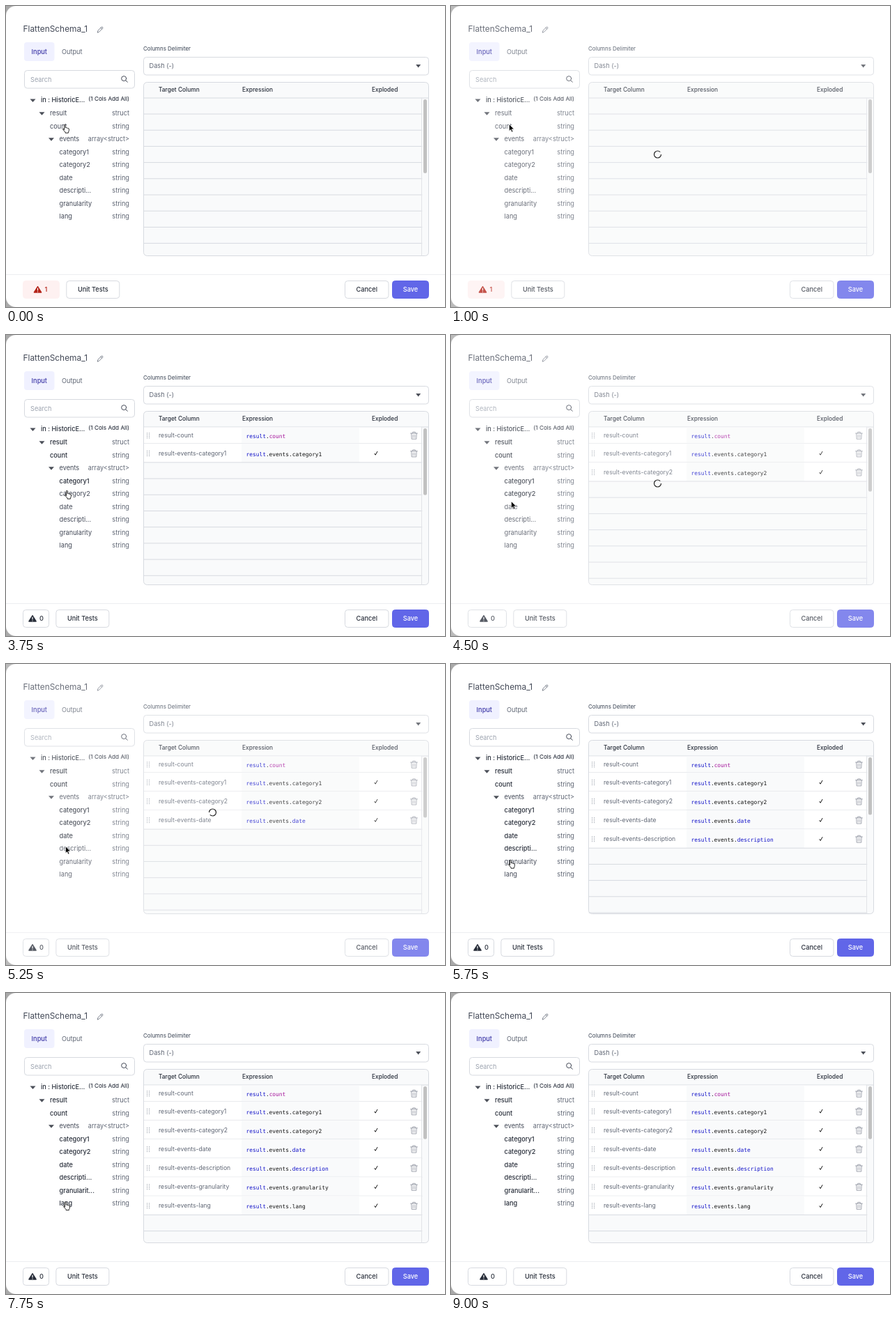
Animation, 630 px wide and 432 px high, one loop 9330 ms. Source, as an HTML page:

```html
<!DOCTYPE html>
<html lang="en">
<head>
<meta charset="utf-8">
<title>Flatten schema dialog</title>
<style>
  html, body { margin: 0; width: 100%; height: 100%; overflow: hidden; background: #fff; }
  svg { display: block; width: 630px; height: 432px; font: 9.2px Inter, sans-serif; }
  .code { font: 7.87px "DejaVu Sans Mono", monospace; white-space: pre; }
  .medium { font-weight: 500; }
  .loading { opacity: .78; filter: blur(.5px); }
</style>
</head>
<body>
<svg id="stage" viewBox="0 0 630 432"></svg>
<script>
const LOOP = 9330, STEP = 125;
const INK = '#272d39', TEXT = '#434957', MUTED = '#5f6674', BORDER = '#d7dae0', PALE = '#f9fafb';
const BLUE = '#1010c8', PURPLE = '#a5149b';

// Each field: name, colour in the expression, and its loading start, insertion and end.
const fields = [
  { name: 'count', color: PURPLE, start: 1000, added: 1250, end: 1375 },
  { name: 'category1', color: '#111', start: 3125, added: 3375, end: 3625 },
  { name: 'category2', color: '#111', start: 4000, added: 4250, end: 4625 },
  { name: 'date', color: BLUE, start: 4750, added: 5000, end: 5125 },
  { name: 'description', color: BLUE, start: 5250, added: 5500, end: 5625 },
  { name: 'granularity', color: '#111', start: 6500, added: 6750, end: 7000 },
  { name: 'lang', color: '#111', start: 7250, added: 7500, end: 7625 }
];

// Cursor stops: time, x, y.
const cursorStops = [
  [0, 83.5, 170], [2000, 83.5, 170], [2750, 86.5, 205], [3250, 86.5, 205], [3625, 86.5, 223],
  [4125, 86.5, 223], [4500, 86.5, 239], [4875, 86.5, 239], [5125, 85.5, 262],
  [5375, 85.5, 262], [5625, 84.5, 281], [6625, 84.5, 281], [7000, 84.5, 299.5], [LOOP, 84.5, 299.5]
];
const CURSOR_GONE = 8500;

const rect = (x, y, w, h, fill, stroke = 'none', r = 0) =>
  `<rect x="${x}" y="${y}" width="${w}" height="${h}" rx="${r}" fill="${fill}" stroke="${stroke}"/>`;
const text = (x, y, label, fill = TEXT, attrs = '') =>
  `<text x="${x}" y="${y}" fill="${fill}" ${attrs}>${label}</text>`;
const path = (d, fill, stroke = 'none', width = 1, move = [0, 0]) =>
  `<path d="${d}" fill="${fill}" stroke="${stroke}" stroke-width="${width}" stroke-linejoin="round" stroke-linecap="round" transform="translate(${move})"/>`;
const line = (x1, x2, y, color = BORDER) => path(`M${x1} ${y}H${x2}`, 'none', color);
const caret = (x, y, w = 8) => path(`M${-w / 2} -2h${w}l${-w / 2} 4.4z`, '#4b4f58', 'none', 1, [x, y]);
const size = px => `font-size="${px}"`;
const MEDIUM = 'class="medium"', CENTER = 'text-anchor="middle"', RIGHT = 'text-anchor="end"';

function header() {
  return text(24.5, 37.3, 'FlattenSchema_1', TEXT, size(11.9)) +
    path('M-3.7 3.8l.7-2.6L2-3.6q.8-.7 1.6 0t0 1.6L-1.2 3zM1-2.7L2.8-1', 'none', MUTED, .8, [135, 34]) +
    rect(26, 52, 43.5, 27, '#f0f1ff', 'none', 4) +
    text(47.8, 69, 'Input', '#3f3aa8', `${MEDIUM} ${CENTER}`) +
    text(80, 69, 'Output', MUTED) +
    text(197, 63.5, 'Columns Delimiter', '#374151', size(7.9)) +
    rect(197.5, 73.5, 409, 25.5, '#fff', BORDER, 4) +
    text(205.5, 89.4, 'Dash (-)', MUTED) + caret(591.7, 86, 7) +
    rect(26.5, 92.5, 158, 25.5, '#fff', BORDER, 4) +
    text(35, 108.5, 'Search', '#9ca3af') +
    path('M3.2-.9a3.5 3.5 0 1 1-7 0a3.5 3.5 0 1 1 7 0M2.3 1.7L4.8 4.3', 'none', TEXT, 1, [169.5, 105]);
}

function tree(count) {
  const rowText = (row, x, label, type, used) => {
    const y = 157 + 18.5 * row;
    return text(x, y, label, used ? INK : TEXT, used ? MEDIUM : '') + text(177, y, type, MUTED, RIGHT);
  };
  const label = (name, used) =>
    name === 'description' ? 'descripti...' : name === 'granularity' && used ? 'granularit...' : name;
  return caret(38.5, 135.5) + caret(51.5, 154.3) + caret(65, 191.3) +
    text(50, 138.2, 'in : HistoricE...', INK, MEDIUM) +
    text(177, 136.3, '(1 Cols Add All)', '#111827', `${RIGHT} ${size(8.2)}`) +
    rowText(0, 63, 'result', 'struct', count > 0) +
    rowText(2, 76.5, 'events', 'array&lt;struct&gt;', false) +
    fields.map(({ name }, i) =>
      rowText(i ? i + 2 : 1, i ? 76.5 : 63, label(name, i < count), 'string', i < count)).join('');
}

function tableRow({ name, color }, i) {
  const top = i ? 128.7 + 27.1 * i : 132.5, height = i ? 27.1 : 23.3;
  const mid = i ? top + 14.1 : 144.3;
  const span = (label, fill) => `<tspan fill="${fill}">${label}</tspan>`;
  let dots = '';
  for (let k = 0; k < 8; k++)
    dots += rect(202 + (k % 2) * 3, mid - 4 + (k >> 1) * 2.3, 1.1, 1.1, '#9ca2ac');
  const middle = i ? span('.events.', '#111') : span('.', '#111');
  return rect(198, top, 399, height, '#fff') + rect(338, top, 169, height, PALE) + dots +
    text(219, mid + 3, (i ? 'result-events-' : 'result-') + name, MUTED, size(8.65)) +
    `<text class="code" x="344.5" y="${mid + 3.9}">${span('result', BLUE)}${middle}${span(name, color)}</text>` +
    (i ? path('M-2 .4L-.8 2.3L1.9-2.6', 'none', '#111', 1, [531, mid]) : '') +
    path('M-4.8-3.2H4.8M-1.8-3.2V-5H1.8V-3.2M-3.8-3.2L-3.3 5H3.3L3.8-3.2M-1.3-1V3M1.3-1V3', 'none', '#8b909c', .8, [585.5, mid]) +
    line(198, 597, top + height);
}

function table(count) {
  const bottom = count ? 155.8 + 27.1 * (count - 1) : 131.8;
  const thumb = 50600 / (count ? 473 + 28 * count : 477);
  let lines = '';
  for (let y = bottom + 23.2; y < 358; y += 23.2) lines += line(198, 597, y);
  return rect(197.5, 109.5, 409, 249, PALE, BORDER, 5) +
    text(219, 123.4, 'Target Column', INK, `${MEDIUM} ${size(8.4)}`) +
    text(339, 123.4, 'Expression', INK, `${MEDIUM} ${size(8.4)}`) +
    text(525, 123.4, 'Exploded', INK, `${MEDIUM} ${size(8.4)}`) +
    line(198, 606, 132) + lines + fields.slice(0, count).map(tableRow).join('') +
    path('M596.5 132V358', 'none', '#e2e4e8') +
    rect(599, 134, 5, thumb, '#c1c1c1', 'none', 2.5);
}

function footer(t, warned) {
  const last = fields.filter(f => f.end <= t).pop();
  const settle = last ? Math.min(1, (t - last.end) / 250) : 1;
  const width = warned ? 53 : 35.5 + 20.5 * settle ** 3;
  const icon = 19 + width / 2, testsX = 24 + width + 9.3;
  const tint = warned ? '#b42318' : INK;
  const box = (x, w, fill, stroke) => rect(x + .5, 394.5, w - 1, 25, fill, stroke, 4);
  const button = (x, w, label, fill = '#fff', stroke = BORDER, color = INK) =>
    box(x, w, fill, stroke) + text(x + w / 2, 410.3, label, color, `${MEDIUM} ${CENTER}`);
  return line(0, 630, 385.5, '#eceef1') +
    (warned ? box(24, width, '#fef1f1', '#fef1f1') : box(24, width, '#fff', BORDER)) +
    path('M0-4.2L5 4H-5z', tint, tint, 1.6, [icon, 407]) +
    path('M0-2V1M0 3.1V3.2', 'none', '#fff', 1.2, [icon, 407]) +
    text(icon + 10, 410.3, warned ? 1 : 0, tint, MEDIUM) +
    button(testsX, 77, 'Unit Tests') + button(486, 63.5, 'Cancel') +
    button(554, 53, 'Save', '#6166e8', '#6166e8', '#fff');
}

function cursor(t, loading) {
  if (t >= CURSOR_GONE) return '';
  const next = cursorStops.findIndex(stop => stop[0] > t);
  const a = cursorStops[next - 1], b = cursorStops[next];
  const p = (t - a[0]) / (b[0] - a[0]), ease = p * p * (3 - 2 * p);
  const x = a[1] + (b[1] - a[1]) * ease, y = a[2] + (b[2] - a[2]) * ease;
  const arrow = loading || (t > 2000 && t < 3000);
  return arrow
    ? path('M0 0V9.4L2.2 7.4L3.8 11L5.4 10.3L3.8 6.8H6.8z', '#000', '#fff', .6, [x, y])
    : path('M2.4 7.4V1.2a.9.9 0 0 1 1.8 0V4.6q1.6-.5 1.9.5q1.4-.4 1.7.5q1.5-.3 1.5 1V8.6q-.1 1.4-1 2.4V12.2H4V11Q2 9 .5 7.2Q.2 6 1.3 6.2z',
      '#fff', '#111', .9, [x - 2.4, y]);
}

function spinner(t) {
  return `<circle cx="296.5" cy="213" r="5" fill="none" stroke="#222" stroke-width="1.2"
    stroke-dasharray="27 4.4" transform="rotate(${(t * .72) % 360} 296.5 213)"/>`;
}

function scene(t) {
  const loading = fields.some(f => t >= f.start && t < f.end);
  const count = fields.filter(f => t >= f.added).length;
  return `<g class="${loading ? 'loading' : ''}">` +
    rect(0, 0, 30, 432, '#a9a9a9') + rect(0, 0, 660, 432, '#fff', 'none', 14) +
    header() + tree(count) + table(count) + footer(t, t < fields[0].end) + '</g>' +
    (loading ? spinner(t) : '') + cursor(t, loading);
}

const stage = document.getElementById('stage');
let shown = -1;
function tick() {
  const t = Math.floor(performance.now() % LOOP / STEP) * STEP;
  if (t !== shown) stage.innerHTML = scene(shown = t);
  requestAnimationFrame(tick);
}
tick();
</script>
</body>
</html>
```
